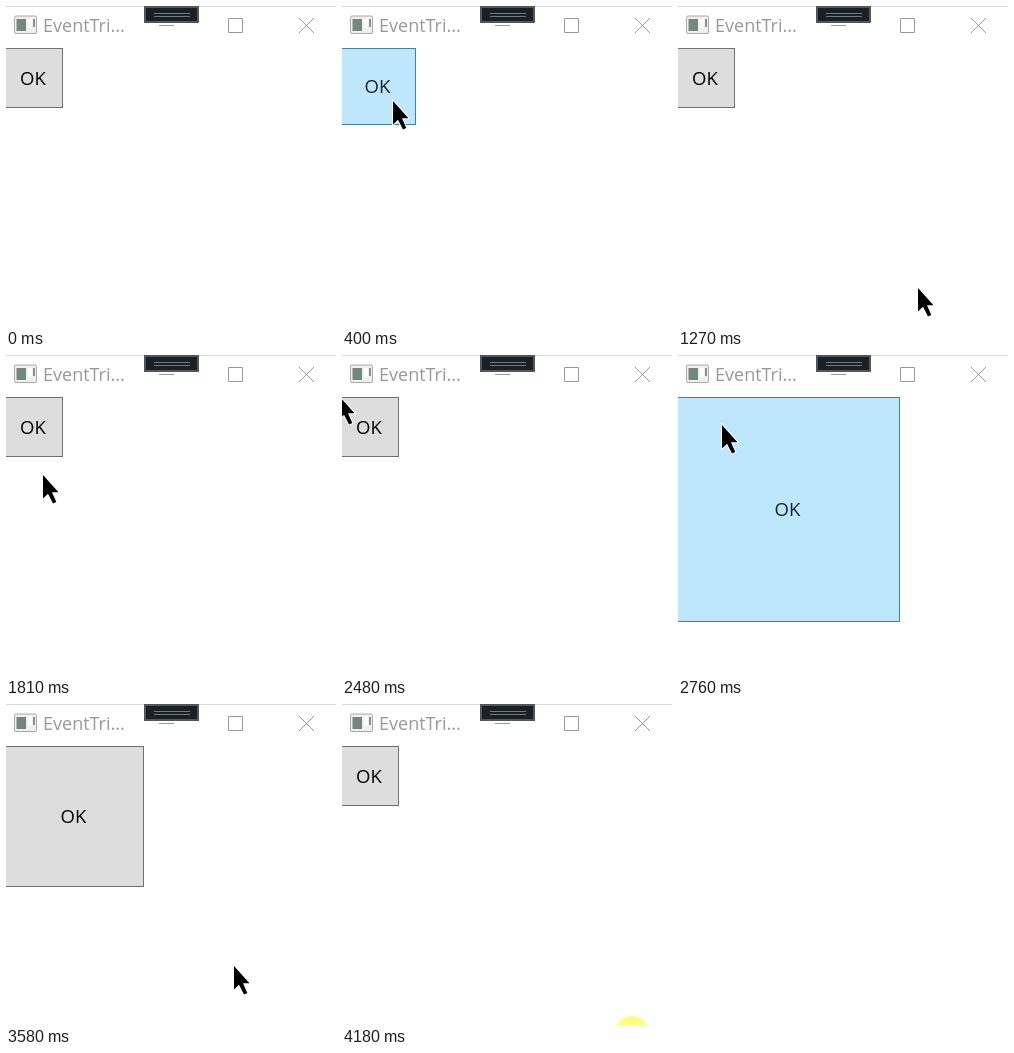
Write an HTML page that moves like this. It is 330 px wide and 321 px high and loops after 4250 ms.

```html
<!DOCTYPE html>
<html lang="en">
<head>
<meta charset="utf-8">
<title>Growing button</title>
<style>
  html, body { margin: 0; width: 100%; height: 100%; overflow: hidden; background: #fff; }
  svg { display: block; width: 330px; height: 321px; }
  text { font-family: "Open Sans", "Noto Sans", sans-serif; }
</style>
</head>
<body>
<svg viewBox="0 0 330 321">
  <path d="M0 .5H330" stroke="#d9dcde"/>
  <!-- window icon -->
  <rect x="8.5" y="10" width="22" height="17.5" rx="1.5" fill="#f0f0f0" stroke="#a8a8a8"/>
  <rect x="10.5" y="13" width="9.5" height="12" fill="#74877f"/>
  <rect x="22" y="13" width="4" height="9" fill="#fff"/>
  <rect x="27" y="13" width="2" height="8" fill="#8c8c8c"/>
  <text x="37" y="26" font-size="18" fill="#999">EventTri...</text>
  <!-- window buttons -->
  <path d="M153 19.5H168M222.5 12.5H236.5V26.5H222.5ZM293 12L308 27M308 12L293 27" fill="none" stroke="#999"/>
  <!-- toolbar handle -->
  <rect x="139" y="1" width="53" height="15" fill="#1b2024" stroke="#50585c" stroke-width="2"/>
  <path d="M148 7.5H184M148 10.5H184" stroke="#6f797f"/>

  <rect id="box" x="-2.5" y="42.5"/>
  <text id="label" font-size="18.5" text-anchor="middle">OK</text>
  <circle id="spot" cx="290" cy="330" r="18" fill="#ffff80"/>
  <path id="cursor" d="M0 0V23.5L5 18.8L10 28.5L13.3 27L9 17.3H15.5Z"
    stroke="#fff" stroke-width="2" paint-order="stroke"/>
</svg>
<script>
const LOOP = 4250, SMALL = 60, BIG = 225, GROW = 200;

// Times at which the pointer enters and leaves the button
const hovers = [[380, 1070], [1830, 1968], [2550, 3479]];

// Pointer strokes: start and end time, from, to
const strokes = [
  [70, 540, [252, 292], [32, 76]],
  [650, 1170, [32, 76], [240, 282]],
  [1530, 2020, [240, 284], [-8, 83]],
  [2480, 2740, [-3, 41], [44, 70]],
  [2960, 3580, [44, 70], [228, 262]],
  [3580, 3850, [228, 262], [249, 280]]
];

const clamp = v => Math.min(1, Math.max(0, v));
const easeOut = p => 1 - (1 - p) ** 2;
const latest = (spans, t) => spans.filter(([start]) => start <= t).pop();

function pointerAt(t) {
  const [start, end, from, to] = latest(strokes, t) || strokes[0];
  const p = easeOut(clamp((t - start) / (end - start)));
  return from.map((v, i) => Math.round(v + (to[i] - v) * p));
}

function buttonAt(t) {
  const [enter, leave] = latest(hovers, t) || hovers[0];
  const grown = clamp((Math.min(t, leave) - enter) / GROW);
  const left = 1 - clamp((t - leave) / GROW);
  return {
    size: Math.round(SMALL + (BIG - SMALL) * Math.max(0, grown - (1 - left))),
    hot: t >= enter && t < leave
  };
}

const [box, label, spot, cursor] =
  ["box", "label", "spot", "cursor"].map(id => document.getElementById(id));

function set(el, attrs) {
  for (const name in attrs) el.setAttribute(name, attrs[name]);
}
const show = (el, on) => set(el, { visibility: on ? "visible" : "hidden" });

function draw(t) {
  const { size, hot } = buttonAt(t);
  set(box, {
    width: size - 1, height: size - 1,
    fill: hot ? "#bee6fd" : "#ddd",
    stroke: hot ? "#3c7fb1" : "#707070"
  });
  set(label, { x: size / 2 - 3, y: 42 + size / 2 + 6.5, fill: hot ? "#16222f" : "#000" });
  set(cursor, { transform: `translate(${pointerAt(t)})` });
  show(cursor, t >= 70 && t < 1968 || t >= 2480 && t < 3920);
  show(spot, t >= 4180);
}

function frame() {
  draw(performance.now() % LOOP);
  requestAnimationFrame(frame);
}
frame();
</script>
</body>
</html>
```
